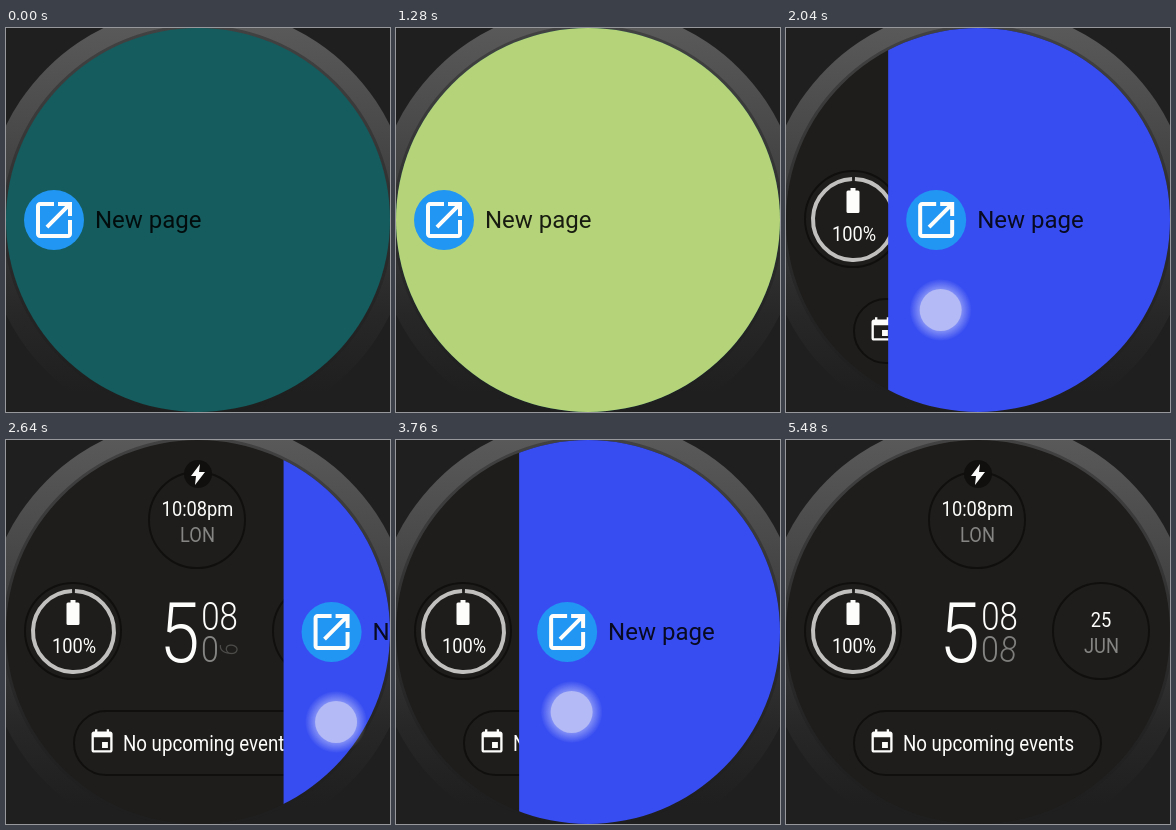
An HTML page with a canvas that plays this animation: 384x384 px, repeating every 5560 ms.

```html
<!DOCTYPE html>
<html>
<head>
<meta charset="utf-8">
<style>
html, body { margin: 0; width: 100%; height: 100%; overflow: hidden; background: #1f1f1f; }
canvas { display: block; }
</style>
</head>
<body>
<canvas id="stage" width="384" height="384"></canvas>
<script>
const ctx = document.getElementById('stage').getContext('2d');
const SIZE = 384, MID = 192, LOOP = 5560, CONDENSED = 0.87;
const WHITE = '#fdfdfb', GREY = '#858583', EDGE = '#100f0e';

const openIcon = new Path2D('M19 19H5V5h7V3H5c-1.11 0-2 .9-2 2v14c0 1.1.89 2 2 2h14c1.1 0 2-.9 2-2v-7h-2v7zM14 3v2h3.59l-9.83 9.83 1.41 1.41L19 6.41V10h2V3h-7z');
const eventIcon = new Path2D('M17 12h-5v5h5v-5zM16 1v2H8V1H6v2H5c-1.11 0-1.99.9-1.99 2L3 19c0 1.1.89 2 2 2h14c1.1 0 2-.9 2-2V5c0-1.1-.9-2-2-2h-1V1h-2zm3 18H5V8h14v11z');
const boltIcon = new Path2D('M194 24L185 36h5l-1 9 10-13h-6z');

// Keys are [time, value, easeOut?]; the flag shapes the segment ending there.
const greenX = [[20, 384], [560, 0, 1], [720, 0], [940, 125], [1000, 114], [1280, 0, 1]];
const sageX = [[1300, 384], [1640, 0, 1]];
const blueX = [[1640, 384], [1860, 0, 1], [1880, 0], [2400, 330], [2440, 330], [2640, 279],
  [3000, 108, 1], [3320, 94, 1], [3440, 94], [3760, 123], [4000, 152], [4382, 384, 1]];
const touchAlpha = [[720, 0], [760, 1], [940, 1], [1015, 0], [1860, 0], [1900, 1], [4000, 1], [4120, 0]];
const touchY = [[1040, 194], [1860, 282], [2640, 282], [3320, 272]];

function track(keys, t) {
  const i = keys.findIndex(k => k[0] > t);
  if (i < 0) return keys[keys.length - 1][1];
  if (i === 0) return keys[0][1];
  const [t0, a] = keys[i - 1], [t1, b, easeOut] = keys[i];
  const p = (t - t0) / (t1 - t0);
  return a + (b - a) * (easeOut ? 1 - (1 - p) ** 3 : p);
}

function circle(x, y, r, fill) {
  ctx.beginPath();
  ctx.arc(x, y, r, 0, 7);
  if (fill) {
    ctx.fillStyle = fill;
    ctx.fill();
  }
}

function outline(color, width) {
  ctx.strokeStyle = color;
  ctx.lineWidth = width;
  ctx.stroke();
}

function icon(path, x, y, scale) {
  ctx.save();
  ctx.translate(x, y);
  ctx.scale(scale, scale);
  ctx.fillStyle = WHITE;
  ctx.fill(path);
  ctx.restore();
}

function label(text, x, y, size, color, weight = 400) {
  ctx.save();
  ctx.translate(x, y);
  ctx.scale(CONDENSED, 1);
  ctx.font = `${weight} ${size}px Roboto, sans-serif`;
  ctx.textAlign = 'center';
  ctx.fillStyle = color;
  ctx.fillText(text, 0, 0);
  ctx.restore();
}

function bezel() {
  ctx.fillStyle = '#1f1f1f';
  ctx.fillRect(0, 0, SIZE, SIZE);
  const metal = ctx.createLinearGradient(0, 0, 0, SIZE);
  metal.addColorStop(0, '#595959');
  metal.addColorStop(0.27, '#494949');
  metal.addColorStop(0.55, '#353535');
  metal.addColorStop(0.75, '#272727');
  metal.addColorStop(0.95, '#1f1f1f');
  circle(MID, MID, 214, metal);
  circle(MID, MID, 193);
  outline('rgba(30,30,30,.4)', 4);
}

function page(color, x) {
  ctx.save();
  ctx.translate(x, 0);
  ctx.fillStyle = color;
  ctx.fillRect(0, 0, SIZE, SIZE);
  circle(48, MID, 30, '#2196f3');
  icon(openIcon, 24, 168, 2);
  ctx.font = '24px Roboto, sans-serif';
  ctx.textAlign = 'left';
  ctx.fillStyle = 'rgba(0,0,0,.87)';
  ctx.fillText('New page', 89, 200);
  ctx.restore();
}

function secondsDigit(t) {
  const start = Math.floor((t - 440) / 1000);
  const p = Math.min(1, (t - 440 - start * 1000) / 520);
  const leaving = p < 0.35;
  const turn = leaving ? (p / 0.35) ** 1.5 : -(((1 - p) / 0.65) ** 1.5);
  ctx.save();
  ctx.translate(222.5, 209);
  ctx.rotate(turn * Math.PI / 2);
  const scale = 1 - 0.35 * Math.abs(turn);
  ctx.scale(scale, scale);
  ctx.globalAlpha = 1 - 0.6 * Math.abs(turn);
  label((start + (leaving ? 3 : 4)) % 10, 0, 13, 37, GREY, 300);
  ctx.restore();
}

function watchFace(t) {
  ctx.fillStyle = '#1e1d1b';
  ctx.fillRect(0, 0, SIZE, SIZE);
  for (const [x, y] of [[191, 80], [67, 191], [315, 191]]) {
    circle(x, y, 48);
    outline(EDGE, 2);
  }
  circle(192, 34, 14, EDGE);
  icon(boltIcon, 0, 0, 1);
  label('10:08pm', 191.5, 76, 21, WHITE);
  label('LON', 191.5, 102, 21, GREY);

  ctx.beginPath();
  ctx.arc(67.5, 191.5, 40.5, -Math.PI / 2 + 0.035, Math.PI * 1.5 - 0.035);
  outline('#c1c0be', 4);
  ctx.fillStyle = WHITE;
  ctx.beginPath();
  ctx.roundRect(60.5, 162.5, 13, 22.5, 1.5);
  ctx.rect(64.5, 160, 5, 3);
  ctx.fill();
  label('100%', 68, 213, 21, WHITE);

  label('25', 315, 187, 21, WHITE);
  label('JUN', 315.5, 213, 21, GREY);

  label('5', 173.5, 222, 83, WHITE, 300);
  label('08', 213.5, 190, 38, WHITE, 300);
  label('0', 204, 222, 37, GREY, 300);
  secondsDigit(t);

  ctx.beginPath();
  ctx.roundRect(68, 271, 247, 64, 32);
  outline(EDGE, 2);
  icon(eventIcon, 82, 288, 1.17);
  label('No upcoming events', 202.5, 311, 21.5, WHITE);
}

function pageStack(green, sage, blue) {
  const cover = 1 - green / SIZE;
  const behind = x => (x - SIZE) / 3;
  ctx.save();
  ctx.translate(MID, MID);
  ctx.scale(1 + 0.043 * cover, 1 + 0.043 * cover);
  ctx.translate(-MID, -MID);
  page('#145c5e', 0);
  ctx.restore();
  ctx.fillStyle = `rgba(0,0,0,${0.1 * cover})`;
  ctx.fillRect(0, 0, SIZE, SIZE);
  page('#b5d47a', green + behind(sage));
  page('#84bba0', sage + behind(blue));
}

function touch(t, green, blue) {
  const alpha = track(touchAlpha, t);
  if (!alpha) return;
  const x = t < 1300 ? green + 36 : t > 4000 ? 204 : blue + 52.5;
  const y = track(touchY, t);
  const glow = ctx.createRadialGradient(x, y, 20, x, y, 31);
  glow.addColorStop(0, 'rgba(255,255,255,.4)');
  glow.addColorStop(1, 'rgba(255,255,255,0)');
  ctx.save();
  ctx.globalAlpha = alpha;
  circle(x, y, 31, glow);
  circle(x, y, 21, 'rgba(225,225,245,.5)');
  ctx.restore();
}

function draw(now) {
  const t = now % LOOP;
  const green = track(greenX, t), sage = track(sageX, t), blue = track(blueX, t);
  bezel();
  ctx.save();
  circle(MID, MID, MID);
  ctx.clip();
  if (t < 1860) pageStack(green, sage, blue);
  else watchFace(t);
  page('#384df1', blue);
  ctx.restore();
  touch(t, green, blue);
}

const begin = performance.now();
function frame() {
  draw(performance.now() - begin);
  requestAnimationFrame(frame);
}
frame();
</script>
</body>
</html>
```
